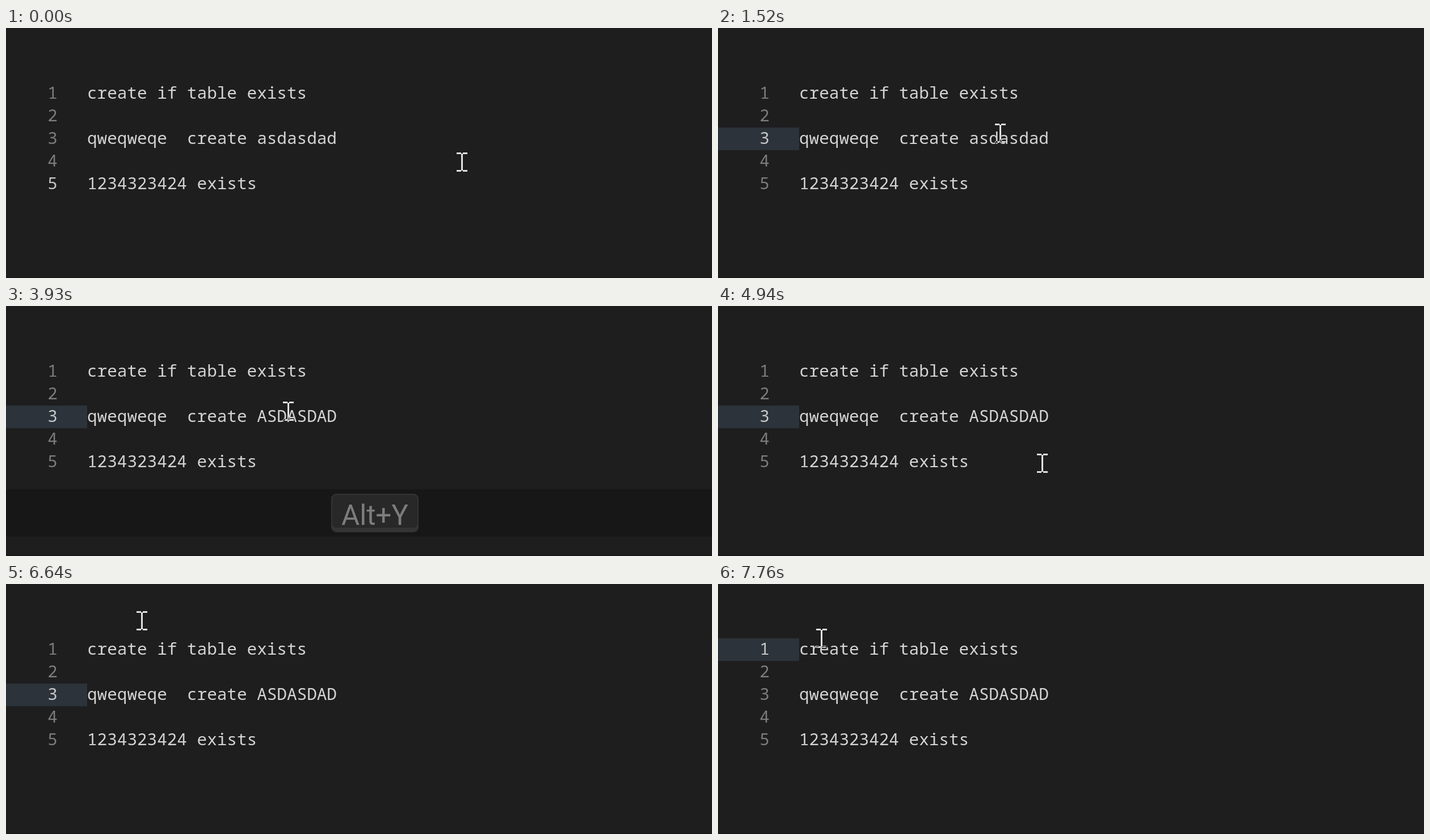
An HTML page with a canvas that plays this animation: 1244x442 px, repeating every 8 s.

```html
<!DOCTYPE html>
<html lang="en">
<head>
<meta charset="utf-8">
<title>Editor</title>
<style>
html, body { margin: 0; width: 100%; height: 100%; overflow: hidden; background: #1e1e1e; }
canvas { display: block; width: 1244px; height: 442px; }
</style>
</head>
<body>
<canvas id="stage" width="1244" height="442"></canvas>
<script>
const LOOP = 8000;
const ctx = document.getElementById('stage').getContext('2d');
const CODE_FONT = '29.33px "Noto Sans Mono", monospace';
const KEY_FONT = '49.3px Roboto, sans-serif';
const ROW = 40, TOP = 96, LEFT = 143, CELL = 17.6;

// Mouse positions: [time, x, y]
const MOUSE = [
  [0, 803.5, 237],
  [100, 792, 231], [200, 744, 212], [300, 668, 192], [400, 602, 184],
  [500, 561, 187], [600, 541, 195], [700, 534.5, 201.5],
  [1420, 513, 194], [1520, 497.5, 186],
  [4830, 522, 232], [4940, 571.5, 278], [5040, 622, 277], [5140, 643.5, 272],
  [5950, 646, 290], [6050, 647.5, 307],
  [6330, 616, 284], [6430, 500, 200], [6540, 345, 113], [6640, 239.5, 65],
  [6740, 219, 27], [6840, 213, 46], [6940, 212.5, 82], [7040, 212.5, 108],
  [7340, 210, 107], [7440, 202, 104], [7540, 191, 100], [7660, 182.5, 96]
];
// Times at which the caret is switched, starting with "on"
const BLINK = [1020, 1520, 2020, 2520, 3030, 3530, 4030, 4530, 5030, 5530, 6050, 6540, 7040, 7760];
// Opacity of the key overlay: [time, alpha]
const KEY_FADE = [[0, 0], [3140, 0.5], [3240, 0.9], [3340, 1], [3930, 0.5], [4030, 0]];

const at = (list, t) => list.findLast(item => item[0] <= t);

function rect(color, x, y, w, h) {
  ctx.fillStyle = color;
  ctx.fillRect(x, y, w, h);
}

function write(text, x, y, color, font) {
  ctx.font = font;
  ctx.fillStyle = color;
  ctx.fillText(text, x, y);
}

function panel(color, x, y, w, h, r) {
  ctx.fillStyle = color;
  ctx.beginPath();
  ctx.roundRect(x, y, w, h, r);
  ctx.fill();
}

function drawCode(t) {
  const word = t < 3140 ? 'asdasdad' : 'ASDASDAD';
  const lines = ['create if table exists', '', 'qweqweqe  create ' + word, '', '1234323424 exists'];
  const active = t < 1020 ? 4 : t < 7240 ? 2 : 0;
  if (t >= 1020) rect('#2c333a', 0, TOP + active * ROW, LEFT, ROW);
  lines.forEach((line, i) => {
    const base = TOP + i * ROW + 28.5;
    write(String(i + 1), 73.3, base, i === active ? '#c8c8c8' : '#7d7d7d', CODE_FONT);
    write(line, LEFT, base, '#d4d4d4', CODE_FONT);
  });
  if (BLINK.filter(b => b <= t).length % 2) {
    const col = active ? 22 : 4;
    rect('#aeafad', Math.floor(LEFT + col * CELL - 1), TOP + active * ROW, 6, ROW);
  }
}

function drawKey(alpha) {
  if (!alpha) return;
  ctx.globalAlpha = alpha;
  rect('#101010', 0, 324, 1244, 84);
  panel('#535353', 573, 332, 154, 68, 9);
  panel('#1c1c1c', 575, 334, 150, 58, 7);
  write('Alt+Y', 591, 387, '#d2d2d2', KEY_FONT);
  ctx.globalAlpha = 1;
}

// The I-beam inverts whatever lies below it
function drawMouse([, x, y]) {
  ctx.globalCompositeOperation = 'difference';
  for (const bar of [y - 17, y + 14]) {
    rect('#fff', x - 9.5, bar, 8, 3);
    rect('#fff', x + 1.5, bar, 8, 3);
  }
  rect('#fff', x - 1.5, y - 15, 3, 30);
  ctx.globalCompositeOperation = 'source-over';
}

function draw(t) {
  rect('#1e1e1e', 0, 0, 1244, 442);
  rect('#191919', 0, 440, 1244, 2);
  drawCode(t);
  drawKey(at(KEY_FADE, t)[1]);
  drawMouse(at(MOUSE, t));
}

const start = performance.now();
function tick() {
  draw((performance.now() - start) % LOOP);
  requestAnimationFrame(tick);
}
tick();
</script>
</body>
</html>
```
